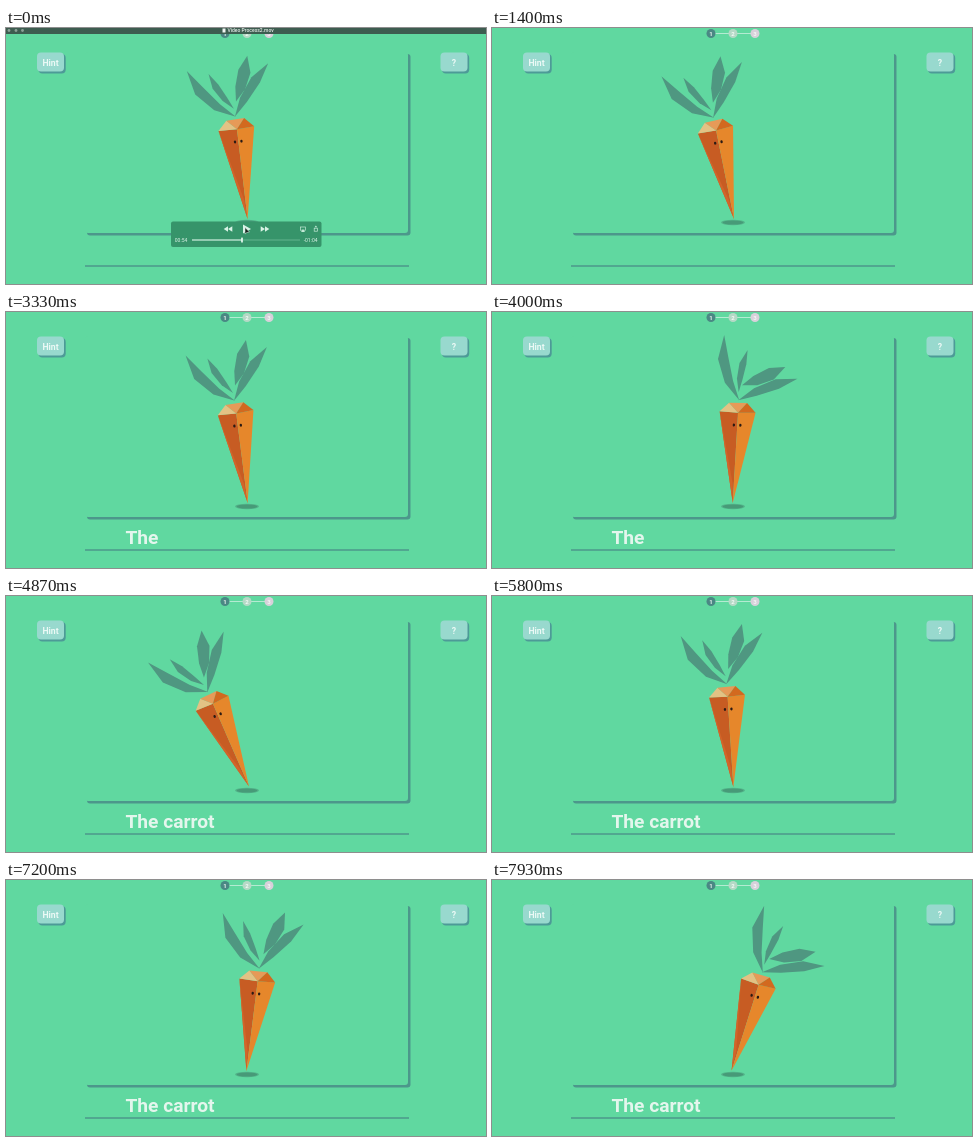
Write an HTML page with a canvas that moves like this. It is 480 px wide and 256 px high and loops after 8000 ms.

```html
<!DOCTYPE html>
<html lang="en">
<head>
<meta charset="utf-8">
<title>The carrot</title>
<style>
  html, body { margin: 0; width: 100%; height: 100%; overflow: hidden; background: #60d8a0; }
  canvas { display: block; width: 480px; height: 256px; }
</style>
</head>
<body>
<canvas id="stage"></canvas>
<script>
const canvas = document.getElementById('stage');
const ctx = canvas.getContext('2d');
const W = 480, H = 256, LOOP = 8000, SWAY = 5140, PLAY_AT = 515;
const BG = '#60d8a0', TEAL = '#4c978b', LEAF = '#4f9781', FONT = 'Roboto, Arial, sans-serif';

const scale = window.devicePixelRatio || 1;
canvas.width = W * scale;
canvas.height = H * scale;

const clamp = v => Math.max(0, Math.min(1, v));
const mix = (a, b, k) => a + (b - a) * k;
const rad = degrees => degrees * Math.PI / 180;

// Turning points of the sway: [ms, degrees]
const turns = [[1385, -12.2], [2670, 24], [3270, -10], [3840, 12.5], [4530, -28],
  [4680, -28], [5940, -1], [6060, -1], [1385 + SWAY, -12.2]];

// Leaves grow from a root: angle and droop in degrees, bow bends the spine
const leaves = [
  { x: 1, y: -98, angle: -40, length: 67, droop: 24, width: 10.5, bow: -7 },
  { x: 0, y: -106, angle: -29, length: 43, droop: 38, width: 7, bow: -2 },
  { x: 3, y: -113, angle: 21, length: 47, droop: 43, width: 12.5, bow: 1 },
  { x: 0, y: -98, angle: 39, length: 63, droop: 28, width: 10, bow: -2 }
];

function pose(t) {
  const time = Math.max(t, PLAY_AT), first = turns[0][0];
  const phase = first + (time - first + SWAY) % SWAY;
  const i = Math.max(1, turns.findIndex(([end]) => phase <= end));
  const [t0, a0] = turns[i - 1], [t1, a1] = turns[i];
  const lean = mix(a0, a1, (phase - t0) / (t1 - t0));
  // Leaves trail while falling left and tilt back on a far right lean
  const trail = a1 < a0 ? clamp((phase - t0) / 60) * clamp((t1 - phase) / 100) : 0;
  const back = -.5 * clamp(lean / 24) ** 3;
  return { lean, bend: mix(back, 1, trail) };
}

function poly(points, color) {
  ctx.beginPath();
  points.forEach(([x, y]) => ctx.lineTo(x, y));
  ctx.closePath();
  ctx.fillStyle = color;
  ctx.fill();
}

function box(x, y, w, h, r, color) {
  ctx.beginPath();
  ctx.roundRect(x, y, w, h, r);
  ctx.fillStyle = color;
  ctx.fill();
}

function oval(x, y, rx, ry, color) {
  ctx.beginPath();
  ctx.ellipse(x, y, rx, ry, 0, 0, Math.PI * 2);
  ctx.fillStyle = color;
  ctx.fill();
}

function label(text, x, y, size, color, align = 'center', weight = 700) {
  ctx.font = `${weight} ${size}px ${FONT}`;
  ctx.textAlign = align;
  ctx.fillStyle = color;
  ctx.fillText(text, x, y);
}

function button(x, text) {
  box(x + 1.5, 26, 27.2, 19.6, 4, '#4d9a97');
  box(x, 24.5, 27, 19, 4, '#98d9ce');
  label(text, x + 13.5, 37.5, 8.7, '#ecf9f6');
}

function steps() {
  box(223, 5, 36, 1, 0, '#b4ebd2');
  ['#4a8884', '#b5d9c6', '#d8d0da'].forEach((fill, i) => {
    oval(219 + i * 22, 5.5, 4.5, 4.5, fill);
    label(i + 1, 219 + i * 22, 7.6, 6, '#f2f8f4');
  });
}

function scene() {
  box(0, 0, W, H, 0, BG);
  steps();
  box(81, 26, 323.5, 181.5, 3, TEAL);
  box(79, 24, 323, 181, 3, BG);
  box(79, 237.3, 324, 1.4, 0, TEAL);
  button(31, 'Hint');
  button(434.5, '?');
}

function drawLeaf({ x, y, angle, length, droop, width, bow }, bend) {
  const a = rad(angle + droop * bend), sin = Math.sin(a), cos = Math.cos(a);
  const at = (s, side) => {
    const along = s * length, across = bow * 4 * s * (1 - s) + side * width / 2;
    return [x + along * sin + across * cos, y - along * cos + across * sin];
  };
  poly([at(0, 0), at(.3, -.8), at(.67, -1), at(1, 0), at(.67, 1), at(.3, .8)], LEAF);
}

function drawBody() {
  const tip = [0, 5], left = [-18, -86], mid = [.5, -85.3], right = [18, -86.3];
  const upLeft = [-9, -95], upRight = [9, -95.5];
  poly([left, mid, tip], '#c75c23');
  poly([left, [-1.2, -15], tip], '#d2652a');
  poly([mid, right, tip], '#e6872b');
  poly([left, upLeft, mid], '#e3c284');
  poly([upLeft, upRight, mid], '#e69a58');
  poly([upRight, right, mid], '#d2691f');
  [-3, 3.5].forEach(x => oval(x, -73, 1.2, 1.5, '#2b1a14'));
}

function carrot(t) {
  const { lean, bend } = pose(t);
  oval(241, 194.5, 12, 2.7, '#53b58a');
  oval(241, 194.5, 10.5, 2, '#479a78');
  ctx.save();
  ctx.translate(241, 186);
  ctx.rotate(rad(lean));
  leaves.forEach(leaf => drawLeaf(leaf, bend));
  drawBody();
  ctx.restore();
}

function sentence(t) {
  if (t < 2200) return;
  label(t < 4130 ? 'The' : 'The carrot', 119.5, 232.3, 19.2, '#e4f6ed', 'left');
}

function arrows(x, dir) {
  [-4.3, 0].forEach(d => {
    const x0 = x + dir * d;
    poly([[x0, 198.2], [x0 + dir * 4.3, 201], [x0, 203.8]], '#d9f3e6');
  });
}

function player() {
  box(165, 193.5, 150.5, 25.5, 2, '#36946a');
  arrows(222, -1);
  arrows(259, 1);
  poly([[237, 196.5], [245, 201], [237, 205.5]], '#d9f3e6');
  ctx.strokeStyle = '#c5ead8';
  ctx.lineWidth = .7;
  ctx.strokeRect(294.5, 199, 5, 3.2);
  ctx.strokeRect(308.2, 200.2, 3.4, 3);
  poly([[297, 201], [299, 204], [295, 204]], '#c5ead8');
  poly([[309.9, 197.5], [311.2, 199.3], [308.6, 199.3]], '#c5ead8');
  box(186, 211.6, 108, 1, 0, '#62b58d');
  box(186, 211.6, 50, 1, 0, '#d9f3e6');
  box(235.2, 209.5, 1.6, 5, .5, '#f2fff9');
  label('00:54', 168.8, 213.9, 5, '#e2f6ec', 'left', 400);
  label('-01:04', 311.5, 213.9, 5, '#e2f6ec', 'right', 400);
  // Mouse pointer
  poly([[239, 199.5], [239, 206], [240.8, 204.6], [243.5, 204]], '#16241d');
  ctx.strokeStyle = '#e9f7f0';
  ctx.lineWidth = .5;
  ctx.stroke();
}

function titleBar() {
  box(0, 0, W, 6, 0, '#3d5d50');
  [3, 10, 16.5].forEach(x => oval(x, 2.5, 1.4, 1.4, '#8ba197'));
  box(216.5, .5, 3, 4, 0, '#f0f5f2');
  label('Video Process2.mov', 221.5, 4.3, 5, '#e3ece7', 'left', 500);
}

function draw(now) {
  const t = now % LOOP;
  const overlay = 1 - clamp((t - 230) / 700);
  ctx.setTransform(scale, 0, 0, scale, 0, 0);
  scene();
  carrot(t);
  sentence(t);
  if (overlay > 0) {
    ctx.globalAlpha = overlay;
    player();
    titleBar();
    ctx.globalAlpha = 1;
  }
  requestAnimationFrame(draw);
}

draw(0);
</script>
</body>
</html>
```
